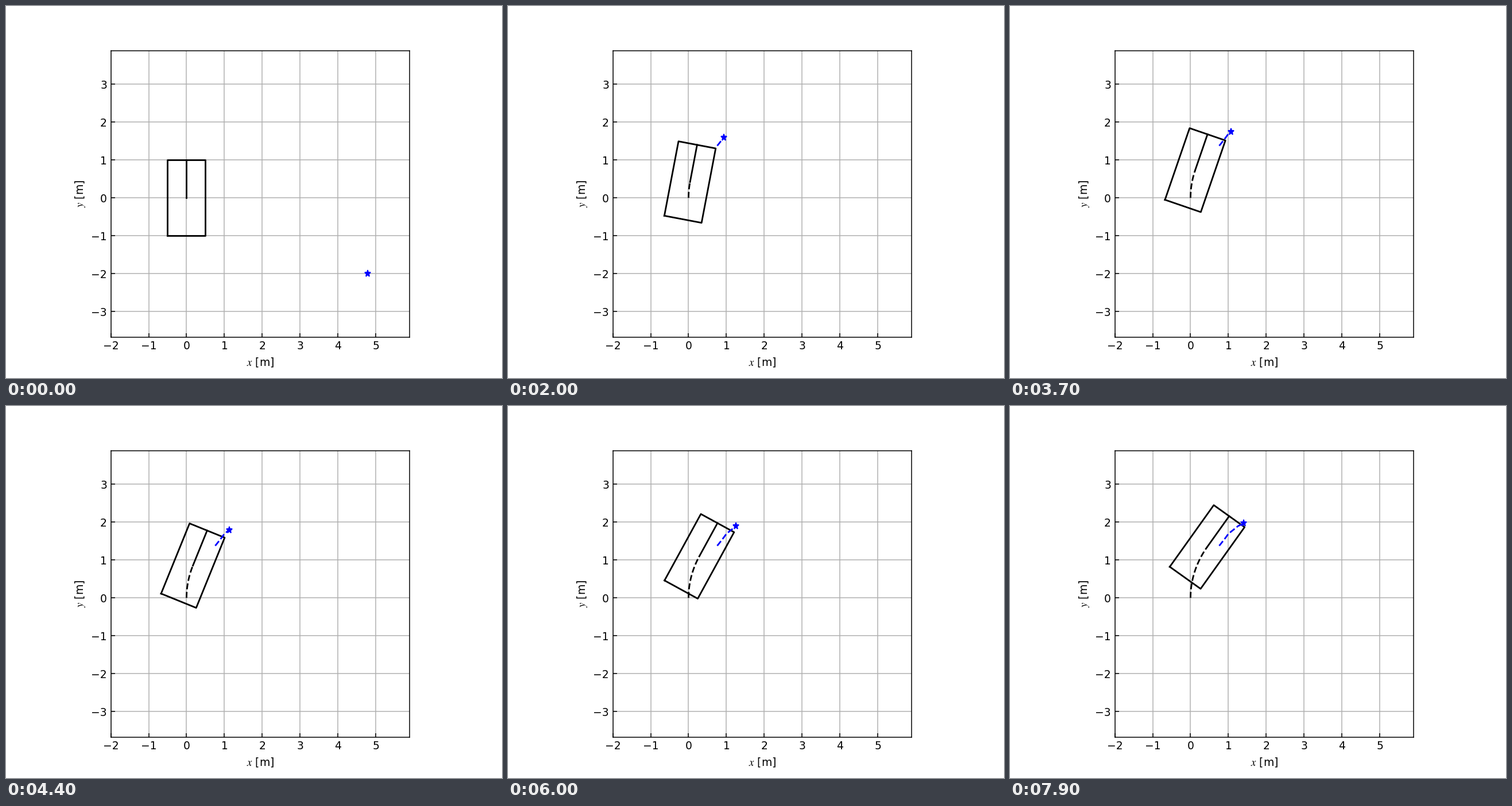
Animation, 864 px wide and 648 px high, one loop 8 s. Source, as a matplotlib script:

```python
import numpy as np
import matplotlib.pyplot as plt
from matplotlib.animation import FuncAnimation

FRAMES = 80
INTERVAL = 100
HALF_W, HALF_L = 0.5, 1.0

plt.rcParams.update({
    "font.family": "DejaVu Sans",
    "font.size": 10,
    "mathtext.fontset": "stix",
    "xtick.direction": "in",
    "ytick.direction": "in",
})

# Vehicle: slowing speed and easing turn, integrated into a path
n = np.arange(FRAMES)
heading = np.radians(0.568 * n - 0.0015 * n**2)
dist = 0.0219 * n - 4.7e-5 * n**2
mid = (heading[1:] + heading[:-1]) / 2
step = np.diff(dist)
pos = np.zeros((FRAMES, 2))
pos[1:, 0] = np.cumsum(step * np.sin(mid))
pos[1:, 1] = np.cumsum(step * np.cos(mid))

# Goal: one far starting point, then a slow drift
keys = [1, 8, 20, 29, 44, 60, 79]
goal = np.column_stack([
    np.interp(n, keys, [0.757, 0.806, 0.931, 1.000, 1.135, 1.257, 1.408]),
    np.interp(n, keys, [1.375, 1.435, 1.595, 1.693, 1.799, 1.898, 1.966]),
])
goal[0] = 4.775, -2.0

BODY = np.array([(-HALF_W, -HALF_L), (-HALF_W, HALF_L), (HALF_W, HALF_L),
                 (HALF_W, -HALF_L), (-HALF_W, -HALF_L)])
NOSE = np.array([(0, 0), (0, HALF_L)])


def place(shape, i):
    """Rotate a body-frame shape clockwise by the heading and move it."""
    c, s = np.cos(heading[i]), np.sin(heading[i])
    return shape @ np.array([[c, -s], [s, c]]) + pos[i]


fig, ax = plt.subplots(figsize=(6.4, 4.8), dpi=135)
ax.set_aspect("equal")
ax.set_xlim(-2, 5.89)
ax.set_ylim(-3.676, 3.887)
ax.set_xticks(range(-2, 6))
ax.set_yticks(range(-3, 4))
ax.set_xlabel("$x$ [m]")
ax.set_ylabel("$y$ [m]")
ax.grid(True)

body, = ax.plot([], [], "k-")
nose, = ax.plot([], [], "k-")
path, = ax.plot([], [], "k--")
trail, = ax.plot([], [], "b--")
star, = ax.plot([], [], "b*")


def update(i):
    body.set_data(*place(BODY, i).T)
    nose.set_data(*place(NOSE, i).T)
    path.set_data(*pos[:i + 1].T)
    trail.set_data(*goal[1:i + 1].T)
    star.set_data(*goal[i:i + 1].T)
    return body, nose, path, trail, star


anim = FuncAnimation(fig, update, frames=FRAMES, interval=INTERVAL,
                     repeat=True, repeat_delay=0)
plt.show()
```
